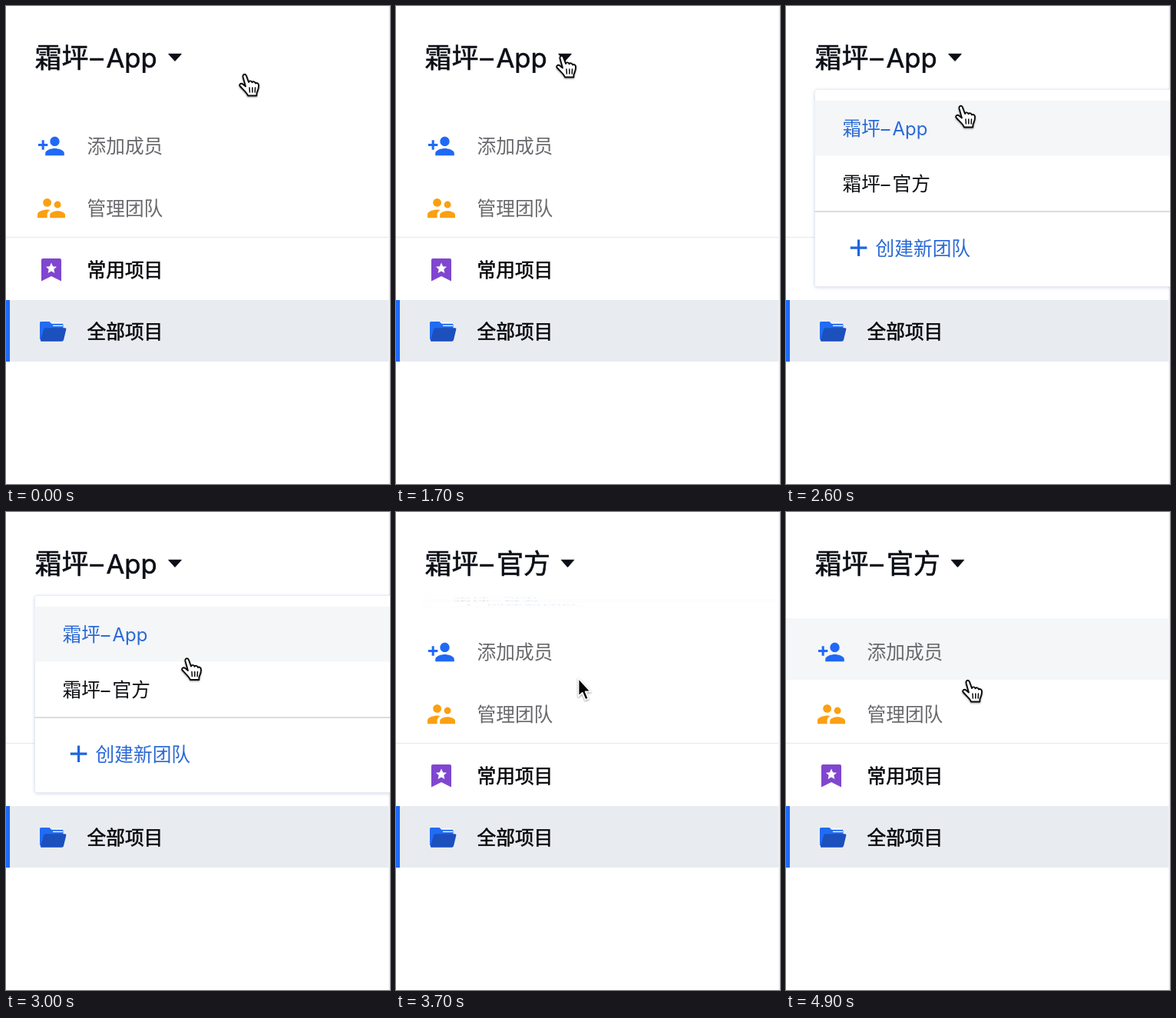
Animation, 500 px wide and 621 px high, one loop 5.9 s. Source, as an HTML page:

```html
<!DOCTYPE html>
<html lang="zh-CN">
<head>
<meta charset="utf-8">
<style>
  html, body { margin: 0; width: 100%; height: 100%; overflow: hidden; background: #fff; }
  svg { display: block; width: 500px; height: 621px; }
  text { font: 24.7px "Noto Sans CJK SC", "Noto Sans CJK", sans-serif; }
  .latin { font-family: Inter, sans-serif; font-size: 24px; }
  .title { font-size: 35px; fill: #0c0f16; stroke: #0c0f16; stroke-width: .6; }
  .title .latin { font-size: 34.6px; }
  .grey { fill: #68696c; }
  .bold { fill: #08090c; stroke: #08090c; stroke-width: .6; }
  .link { fill: #2b69d6; }
  #menu { filter: drop-shadow(0 1px 2px #7d90c855); }
  #cursor { filter: drop-shadow(0 1.5px 1px #0006); }
</style>
</head>
<body>
<svg viewBox="0 0 500 621">
  <rect x="498.5" width="1.5" height="621" fill="#e9eaed"/>

  <!-- header -->
  <text class="title" y="79.5"><tspan x="37.5">霜坪</tspan><tspan class="latin" x="109.5">–</tspan><tspan id="appTitle" class="latin" x="130.5">App</tspan><tspan id="siteTitle" x="131">官方</tspan></text>
  <path id="caret" d="M211.7 62.3H228.3L220 71.5Z" fill="#0c0f16" stroke="#0c0f16" stroke-linejoin="round"/>

  <!-- sidebar -->
  <rect id="addHover" y="138" width="498.5" height="80" fill="#f4f6f8"/>
  <path d="M0 300.5H498" stroke="#ebecee" stroke-width="1.6"/>
  <rect y="382" width="498.5" height="80" fill="#e8ecf1"/>
  <rect y="382" width="5" height="80" fill="#1f6bfb"/>

  <path transform="translate(40.5 163.6) scale(1.535)" fill="#2069f5" d="M15 12c2.21 0 4-1.79 4-4s-1.79-4-4-4-4 1.79-4 4 1.79 4 4 4zm-9-2V7H4v3H1v2h3v3h2v-3h3v-2H6zm9 4c-2.67 0-8 1.34-8 4v2h16v-2c0-2.66-5.33-4-8-4z"/>
  <path transform="translate(37.4 241) scale(1.8)" fill="#faa012" d="M16.5 12a2.5 2.5 0 1 0 0-5 2.5 2.5 0 0 0 0 5zM9 11a3 3 0 1 0 0-6 3 3 0 0 0 0 6zm7.5 3c-1.83 0-5.5.92-5.5 2.75V19h11v-2.25c0-1.83-3.67-2.75-5.5-2.75zM9 13c-2.33 0-7 1.17-7 3.5V19h7v-2.25c0-.85.33-2.34 2.37-3.47C10.5 13.1 9.66 13 9 13z"/>
  <path d="M48 328H70Q72 328 72 330V357.5L59 351L46 357.5V330Q46 328 48 328Z" fill="#8046d0"/>
  <path d="M59 333.5L61.1 338.2L66.1 338.7L62.3 342L63.4 347L59 344.4L54.6 347L55.7 342L51.9 338.7L56.9 338.2Z" fill="#fff"/>
  <path d="M45.5 410H56.5L59 412.5H73Q74.5 412.5 74.5 414.5V434H46Q44 434 44 432V411.5Q44 410 45.5 410Z" fill="#206cf4"/>
  <path d="M59.5 411.8H73.5M61 415.3H74" stroke="#fff" stroke-width="1.3"/>
  <path d="M51.5 418.2H76.5Q78.8 418.2 78.3 420.2L75 434Q74.5 435.7 72.5 435.7H46Q44.5 435.7 45 434L49 420.2Q49.5 418.2 51.5 418.2Z" fill="#1b50bd"/>

  <g class="grey">
    <text x="105.5" y="191.2">添加成员</text>
    <text x="105.5" y="271.6">管理团队</text>
  </g>
  <g class="bold">
    <text x="105.5" y="352">常用项目</text>
    <text x="105.5" y="432.2">全部项目</text>
  </g>

  <!-- team menu, origin at its top edge -->
  <g id="menu">
    <rect x="37.5" width="480" height="256" rx="3" fill="#fff" stroke="#e6eaf3" stroke-width=".8"/>
    <rect id="rowHover" x="37.5" width="463" height="71.5" fill="#f4f6f8"/>
    <path d="M37.5 158.4H500" stroke="#d0d2d5" stroke-width="1.5"/>
    <text class="link" y="59.5"><tspan x="73.5">霜坪</tspan><tspan class="latin" x="123.5">–</tspan><tspan class="latin" x="138.5">App</tspan></text>
    <text y="131.2" fill="#0d0f13"><tspan x="73.5">霜坪</tspan><tspan class="latin" x="123.5">–</tspan><tspan x="138.5">官方</tspan></text>
    <path d="M83.8 205.7H105.4M94.6 195V216.4" stroke="#1f65dc" stroke-width="3.2"/>
    <text class="link" x="116.6" y="215.3">创建新团队</text>
  </g>

  <g id="cursor" stroke-linejoin="round" stroke-linecap="round">
    <g id="hand" fill="#fff" stroke="#0b0b0b">
      <path stroke-width="1.9" d="M10 18.5L6.6 6.5C5.8 2.8 9.6 1.3 11 4.8L14 13C14.6 10.8 17.8 10.8 18.5 13.3C19.5 11.6 22.3 12 23 14.5C24.5 13.4 27 14.4 27 17C27.3 22 25.5 24 24.5 27L24.3 30.5H13C12 27 7.5 23.5 3 18.5C1 16 3.6 13.7 6.3 15.4Z"/>
      <path stroke-width="1.5" d="M15 20L15.4 26M18.8 20V26M22.5 20L22.2 26"/>
    </g>
    <path id="arrow" transform="translate(9.5 0)" d="M0 0V23.5L5.2 18.8L9 28L13 26.3L9.2 17.3H16Z" fill="#050505" stroke="#fff" stroke-width="1.8"/>
  </g>
</svg>
<script>
const LOOP = 5900, STEP = 100;
const $ = id => document.getElementById(id);
const show = (id, on) => $(id).setAttribute("visibility", on ? "inherit" : "hidden");
const clamp = v => Math.max(0, Math.min(1, v));
const smooth = p => p * p * (3 - 2 * p);
const easeOut = p => 1 - (1 - p) ** 5;

// cursor stops: time, x, y
const path = [
  [900, 302, 86], [1500, 207, 62],
  [2100, 207, 62], [2600, 219, 127],
  [2700, 225, 135], [3200, 228, 216]
];

function cursorAt(t) {
  let [, x, y] = path[0];
  for (let i = 1; i < path.length; i++) {
    const [t0, x0, y0] = path[i - 1], [t1, x1, y1] = path[i];
    if (t < t0) break;
    const p = smooth(clamp((t - t0) / (t1 - t0)));
    x = x0 + (x1 - x0) * p;
    y = y0 + (y1 - y0) * p;
  }
  return [x, y];
}

function draw(t) {
  const [x, y] = cursorAt(t);
  const tip = y + 2;
  const switched = t >= 3600;
  const isArrow = t >= 3700 && t < 3800;
  const open = easeOut(clamp((t - 1700) / 250)) * (1 - easeOut(clamp((t - 3570) / 300)));

  show("appTitle", !switched);
  show("siteTitle", switched);
  $("caret").setAttribute("transform", `translate(${switched ? 3.5 : 0} 0)`);
  show("addHover", t >= 3800);

  show("menu", open > 0.01);
  $("menu").setAttribute("transform", `translate(0 108.5) scale(1 ${open})`);
  $("menu").setAttribute("opacity", open ** 0.7);
  show("rowHover", open > 0.01 && tip >= 123);
  $("rowHover").setAttribute("y", tip >= 195 ? 86.5 : 14.5);

  $("cursor").setAttribute("transform", `translate(${x} ${y})`);
  show("hand", !isArrow);
  show("arrow", isArrow);
}

const start = performance.now();
function tick() {
  const t = (performance.now() - start) % LOOP;
  draw(Math.floor(t / STEP) * STEP);
  requestAnimationFrame(tick);
}
tick();
</script>
</body>
</html>
```
